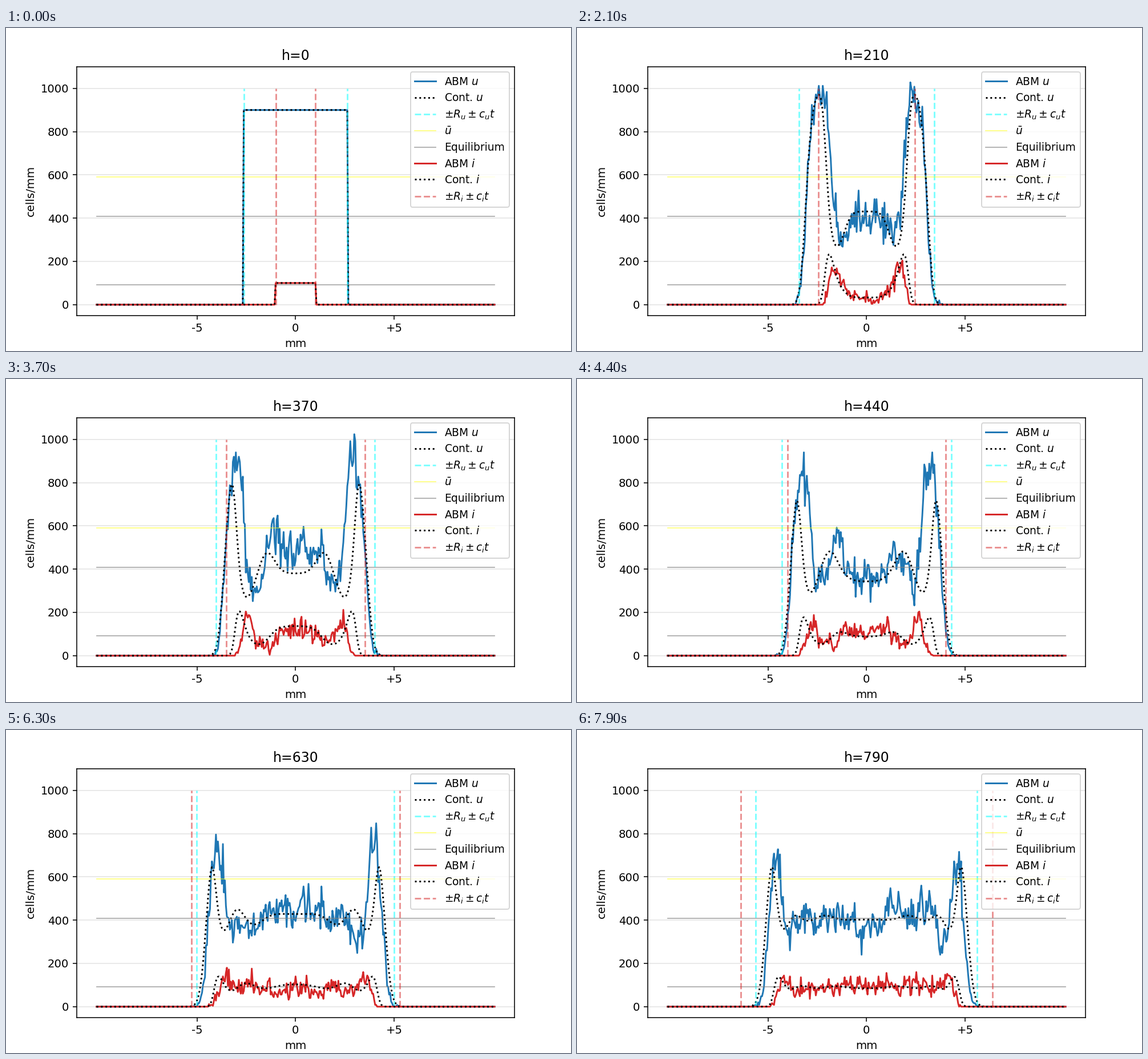
A matplotlib script that plays this animation: 990x566 px, repeating every 8000 ms.

```python
import numpy as np
import matplotlib.pyplot as plt
from matplotlib.animation import FuncAnimation

W, H, DPI = 990, 566, 141.4
FRAMES, HOURS = 80, 10          # frames per loop, hours per frame

# Model: logistic growth, infection, death of infected cells, diffusion
P, Q, BETA, D, K = 0.0187, 0.0417, 0.102, 1.88e-4, 1000
RU, RI = 2.6, 1.0
CU = 2 * np.sqrt(D * P)
CI = 2 * np.sqrt(D * (BETA - Q))
U_EQ = Q * K / BETA
I_EQ = P * (K - U_EQ) / (P + BETA)

DX = 0.05
x = np.linspace(-10, 10, 401)
u0 = np.where(abs(x) < RU + DX / 2, 900.0, 0.0)
i0 = np.where(abs(x) < RI + DX / 2, 100.0, 0.0)


def spread(n):
    return np.roll(n, 1) + np.roll(n, -1) - 2 * n


def continuum(dt=0.1):
    u, i = u0.copy(), i0.copy()
    out = []
    for _ in range(FRAMES):
        out.append((u, i))
        for _ in range(round(HOURS / dt)):
            inf = BETA / K * u * i
            du = D / DX**2 * spread(u) + P * u * (1 - (u + i) / K) - inf
            di = D / DX**2 * spread(i) + inf - Q * i
            u, i = u + dt * du, i + dt * di
    return out


def agents(runs=5, dt=0.5, seed=4):
    """Mean density of several stochastic runs with whole cells per site."""
    rng = np.random.default_rng(seed)
    cap = K * DX
    jump = 2 * D * dt / DX**2

    def walk(n):
        moving = rng.binomial(n, jump)
        left = rng.binomial(moving, 0.5)
        return n - moving + np.roll(left, -1, 1) + np.roll(moving - left, 1, 1)

    u, i = (np.tile(np.rint(n * DX).astype(int), (runs, 1)) for n in (u0, i0))
    out = []
    for _ in range(FRAMES):
        out.append((u.mean(0) / DX, i.mean(0) / DX))
        for _ in range(round(HOURS / dt)):
            u, i = walk(u), walk(i)
            room = 1 - (u + i) / cap
            change = rng.binomial(u, np.clip(P * dt * abs(room), 0, 1))
            new = rng.binomial(u, np.clip(BETA * dt * i / cap, 0, 1))
            dead = rng.binomial(i, Q * dt)
            u = np.maximum(u + np.sign(room).astype(int) * change - new, 0)
            i = i + new - dead
    return out


cont, abm = continuum(), agents()

fig, ax = plt.subplots(figsize=((W + 1e-6) / DPI, (H + 1e-6) / DPI), dpi=DPI)
fig.subplots_adjust(left=0.125, right=0.9, bottom=0.11, top=0.88)
ax.set_xlim(-11, 11)
ax.set_ylim(-50, 1100)
ax.set_xticks([-4.95, 0, 4.95], ["-5", "0", "+5"])
ax.set_yticks(range(0, 1001, 200))
ax.grid(axis="y", alpha=0.35)
ax.set_xlabel("mm")
ax.set_ylabel("cells/mm")
title = ax.set_title("h=0")


def curve(label, color, style="-"):
    return ax.plot(x, 0 * x, style, color=color, label=label)[0]


def fronts(label, color):
    return [ax.plot([0, 0], [0, K], "--", color=color, alpha=0.5, label=name)[0]
            for name in (label, "_")]


def level(y, label, color, alpha):
    ax.plot([-10, 10], [y, y], color=color, lw=0.9, alpha=alpha, label=label)


abm_u = curve("ABM $u$", "tab:blue")
cont_u = curve("Cont. $u$", "black", ":")
front_u = fronts(r"$\pm R_u \pm c_u t$", "cyan")
level(K - U_EQ, r"$\bar{u}$", "yellow", 0.5)
level(U_EQ, "Equilibrium", "gray", 0.65)
level(I_EQ, "_", "gray", 0.65)
abm_i = curve("ABM $i$", "tab:red")
cont_i = curve("Cont. $i$", "black", ":")
front_i = fronts(r"$\pm R_i \pm c_i t$", "tab:red")
ax.legend(loc="upper right", fontsize=9.5)


def update(k):
    h = k * HOURS
    title.set_text(f"h={h}")
    for line, y in zip((abm_u, abm_i, cont_u, cont_i), abm[k] + cont[k]):
        line.set_ydata(y)
    for pair, r in ((front_u, RU + CU * h), (front_i, RI + CI * h)):
        for line, pos in zip(pair, (-r, r)):
            line.set_xdata([pos, pos])
    return []


anim = FuncAnimation(fig, update, frames=FRAMES, interval=100,
                     init_func=lambda: update(0), repeat=True, repeat_delay=0)
plt.show()
```
